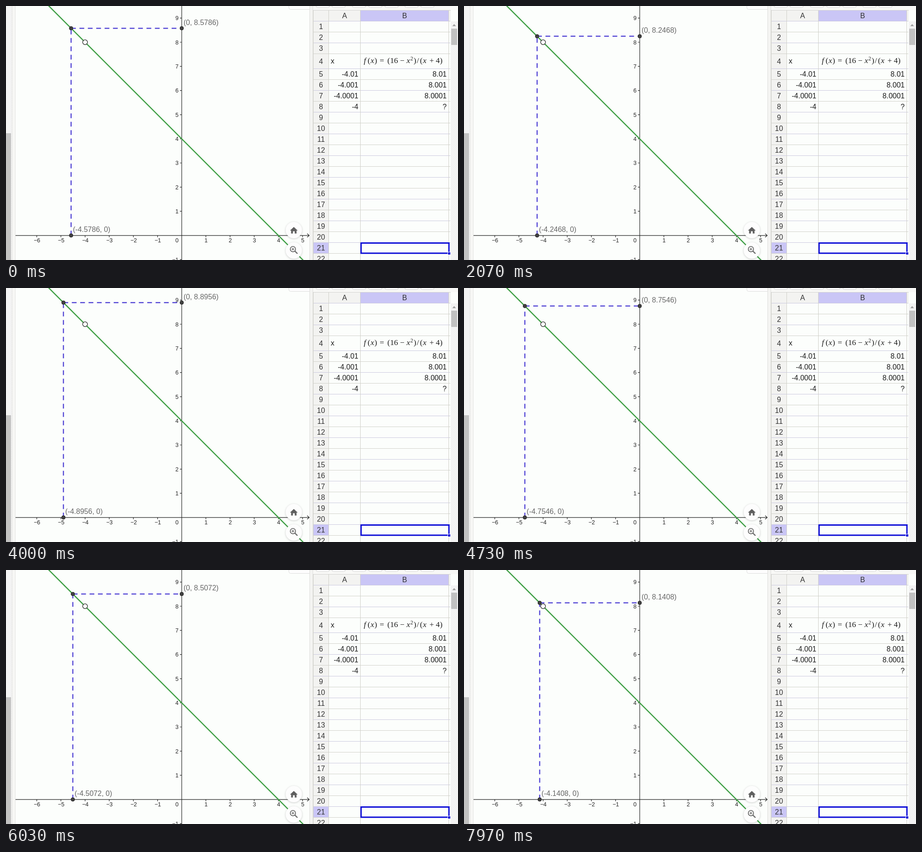
Write an HTML page that moves like this. It is 998 px wide and 561 px high and loops after 8 s.

```html
<!DOCTYPE html>
<html lang="en">
<head>
<meta charset="utf-8">
<title>Limit of a function</title>
<style>
  html, body { margin: 0; width: 100%; height: 100%; overflow: hidden; background: #fcfefc; }
  svg { display: block; width: 998px; height: 561px; font-family: "Liberation Sans", Arial, sans-serif; font-size: 16px; }
  .tick { font-size: 12.5px; fill: #222; }
  .label { fill: #666; }
  .head { fill: #333; text-anchor: middle; }
  .dash { stroke: #574ad6; stroke-width: 2.5; stroke-dasharray: 10.5 8; }
  .dot { fill: #424242; stroke: #1c1c1c; }
  .math { font: 17.5px "Liberation Serif", "Noto Serif", serif; fill: #1c1c1c; }
  .math .i { font-style: italic; }
  .button { fill: #fdfdfd; filter: drop-shadow(0 1px 2px #0003); }
</style>
</head>
<body>
<svg viewBox="0 0 998 561">
  <defs>
    <clipPath id="plotArea"><rect x="21" width="649" height="561"/></clipPath>
    <pattern id="track" width="4" height="4" patternUnits="userSpaceOnUse">
      <rect width="4" height="4" fill="#f5f5f5"/>
      <path d="M0 0h1v1h-1zM2 2h1v1h-1z" fill="#e4e4e4"/>
    </pattern>
  </defs>

  <rect width="998" height="561" fill="#fcfefc"/>
  <rect width="13" height="561" fill="url(#track)"/>
  <rect y="281" width="11" height="280" fill="#c2c2c2"/>
  <rect x="13" width="7" height="561" fill="#f7f7f5"/>
  <path d="M13.5 0V561M20.5 0V561" stroke="#e2e2e0"/>

  <g clip-path="url(#plotArea)">
    <g id="axes"></g>
    <path id="graph" stroke="#3f9f45" stroke-width="2.5"/>
    <line id="drop" class="dash"/>
    <line id="across" class="dash"/>
    <circle id="onLine" class="dot" r="4"/>
    <circle id="onX" class="dot" r="4"/>
    <circle id="onY" class="dot" r="4"/>
    <circle id="hole" r="5.3" fill="#fff" stroke="#222" stroke-width="1.3"/>
    <text id="xLabel" class="label"/>
    <text id="yLabel" class="label"/>
  </g>

  <circle class="button" cx="635.5" cy="495" r="18"/>
  <path d="M627 496L635.5 488 644 496H641.5V502.5H637.5V497.5H633.5V502.5H629.5V496Z" fill="#5f5f5f"/>
  <circle class="button" cx="635.5" cy="540" r="18"/>
  <g fill="none" stroke="#666" stroke-width="1.8">
    <circle cx="633.5" cy="537" r="5.8"/>
    <path d="M637.5 541L643.5 547" stroke-width="2.4"/>
    <path d="M630.5 537H636.5M633.5 534V540" stroke-width="1.3"/>
  </g>
  <rect x="624.5" y="-20" width="60" height="27.5" rx="4" fill="#fdfdfd" stroke="#ddd" clip-path="url(#plotArea)"/>

  <rect x="670" width="8" height="561" fill="#f4f4f2"/>
  <path d="M670.5 0V561M677.5 0V561" stroke="#dededc"/>
  <rect x="678" width="320" height="9" fill="#f8f8f6"/>
  <g id="toolbar" fill="#fdfdfd" stroke="#d4d4d4"></g>

  <g id="sheet"></g>
  <text class="math" y="125.5">
    <tspan x="790" class="i">f</tspan><tspan x="798.5">(</tspan><tspan x="805" class="i">x</tspan><tspan x="813.5">)</tspan>
    <tspan x="825">=</tspan><tspan x="842">(</tspan><tspan x="848">16</tspan><tspan x="870">−</tspan>
    <tspan x="884.5" class="i">x</tspan><tspan x="893" dy="-6" font-size="11.5">2</tspan><tspan x="900" dy="6">)</tspan><tspan x="907">/</tspan>
    <tspan x="914">(</tspan><tspan x="920.5" class="i">x</tspan><tspan x="935">+</tspan><tspan x="949">4</tspan><tspan x="958">)</tspan>
  </text>
  <rect x="784" y="523.5" width="194" height="22.5" fill="none" stroke="#0a0ad6" stroke-width="3"/>
  <rect x="975.5" y="543.5" width="6" height="6" fill="#0a0ad6" stroke="#fff"/>

  <rect x="982" y="34" width="16" height="527" fill="url(#track)"/>
  <rect x="983" y="50" width="13" height="36" fill="#c1c1c1"/>
  <path d="M985.5 44.5L989.5 40 993.5 44.5Z" fill="#999"/>
</svg>
<script>
const UNIT = 53.35, OX = 388, OY = 506.8;
const px = x => OX + x * UNIT;
const py = y => OY - y * UNIT;
const el = id => document.getElementById(id);

function add(parent, tag, attrs, text) {
  const node = document.createElementNS("http://www.w3.org/2000/svg", tag);
  set(node, attrs);
  if (text !== undefined) node.textContent = text;
  parent.append(node);
}
function set(node, attrs) {
  for (const key in attrs) node.setAttribute(key, attrs[key]);
}

function drawAxes() {
  const axes = el("axes");
  const number = n => String(n).replace("-", "−");
  let d = `M21 ${OY}H669M665 ${OY - 4}L669.5 ${OY}L665 ${OY + 4}M${OX} 0V561`;
  for (let n = -6; n <= 5; n++) {
    if (n) {
      d += `M${px(n)} ${OY}v4`;
      add(axes, "text", { class: "tick", x: px(n) + 0.5, y: 522, "text-anchor": "middle" }, number(n));
    }
  }
  for (let n = -1; n <= 9; n++) {
    if (n) {
      d += `M${OX} ${py(n)}h-4`;
      add(axes, "text", { class: "tick", x: 381, y: py(n) + 4.5, "text-anchor": "end" }, number(n));
    }
  }
  add(axes, "text", { class: "tick", x: 374, y: 522 }, "0");
  add(axes, "path", { d, fill: "none", stroke: "#222", "stroke-width": 1.2 });
  el("graph").setAttribute("d", `M${px(-6)} ${py(10)}L${px(6)} ${py(-2)}`);
  set(el("hole"), { cx: px(-4), cy: py(8) });
}

function drawSheet() {
  const sheet = el("sheet");
  const rowTop = r => r < 5 ? 9 + 24 * r : 138 + 24 * (r - 5);
  const box = (x, y, width, height, fill) => add(sheet, "rect", { x, y, width, height, fill });
  const cell = (right, row, text) =>
    add(sheet, "text", { x: right, y: rowTop(row) + 17.5, "text-anchor": "end", fill: "#1c1c1c" }, text);

  box(678, 9, 304, 24, "#f3f3f1");
  box(678, 33, 35, 528, "#f3f3f1");
  box(783, 9, 195, 24, "#cac6f6");
  box(678, 522, 35, 24, "#cac6f6");
  add(sheet, "text", { class: "head", x: 747.5, y: 26.5 }, "A");
  add(sheet, "text", { class: "head", x: 880, y: 26.5 }, "B");

  add(sheet, "path", { d: "M678 9.5H982", stroke: "#d2d2d0" });
  for (let r = 1; r <= 22; r++) {
    const top = rowTop(r), middle = r === 4 ? top + 17 : top + 12;
    add(sheet, "path", { d: `M678 ${top + 0.5}H981`, stroke: r % 2 ? "#cbc9df" : "#d2d2cb" });
    add(sheet, "text", { class: "head", x: 695.5, y: middle + 5.5 }, r);
  }
  add(sheet, "path", { d: "M678.5 9V561M712.5 9V561M782.5 9V561M977.5 9V561", stroke: "#cfcfc8" });

  add(sheet, "text", { x: 717, y: 127, fill: "#1c1c1c" }, "x");
  [["-4.01", "8.01"], ["-4.001", "8.001"], ["-4.0001", "8.0001"], ["-4", "?"]].forEach(([a, b], i) => {
    cell(778, 5 + i, a);
    cell(973, 5 + i, b);
  });

  for (const x of [684, 719, 764, 800, 836, 880, 915])
    add(el("toolbar"), "rect", { x: x + 0.5, y: -20, width: 30, height: 23.5, rx: 4 });
}

// Tick and position before wrapping; the slider runs from -5 to -4.05.
const FPS = 30, MIN = -5, RANGE = 0.95;
const keys = [[0, -4.5786], [62, -4.2468], [97, -4.096], [120, -3.9456],
              [160, -3.6892], [202, -3.4253], [239, -3.1908], [240, -3.1845]];

function sliderAt(tick) {
  const i = Math.max(1, keys.findIndex(k => k[0] >= tick));
  const [t0, x0] = keys[i - 1], [t1, x1] = keys[i];
  const x = x0 + (x1 - x0) * (tick - t0) / (t1 - t0);
  return MIN + (x - MIN) % RANGE;
}

function render(ms) {
  const tick = Math.min(239, Math.floor((ms + 4) * FPS / 1000));
  const x = +sliderAt(tick).toFixed(4), y = +(4 - x).toFixed(4);
  const X = px(x), Y = py(y);
  set(el("drop"), { x1: X, y1: OY, x2: X, y2: Y });
  set(el("across"), { x1: X, y1: Y, x2: OX, y2: Y });
  set(el("onLine"), { cx: X, cy: Y });
  set(el("onX"), { cx: X, cy: OY });
  set(el("onY"), { cx: OX, cy: Y });
  set(el("xLabel"), { x: X + 4, y: OY - 7.5 });
  set(el("yLabel"), { x: OX + 4, y: Y - 7.5 });
  el("xLabel").textContent = `(${x}, 0)`;
  el("yLabel").textContent = `(0, ${y})`;
}

drawAxes();
drawSheet();
const start = performance.now();
function loop() {
  render((performance.now() - start) % 8000);
  requestAnimationFrame(loop);
}
loop();
</script>
</body>
</html>
```
